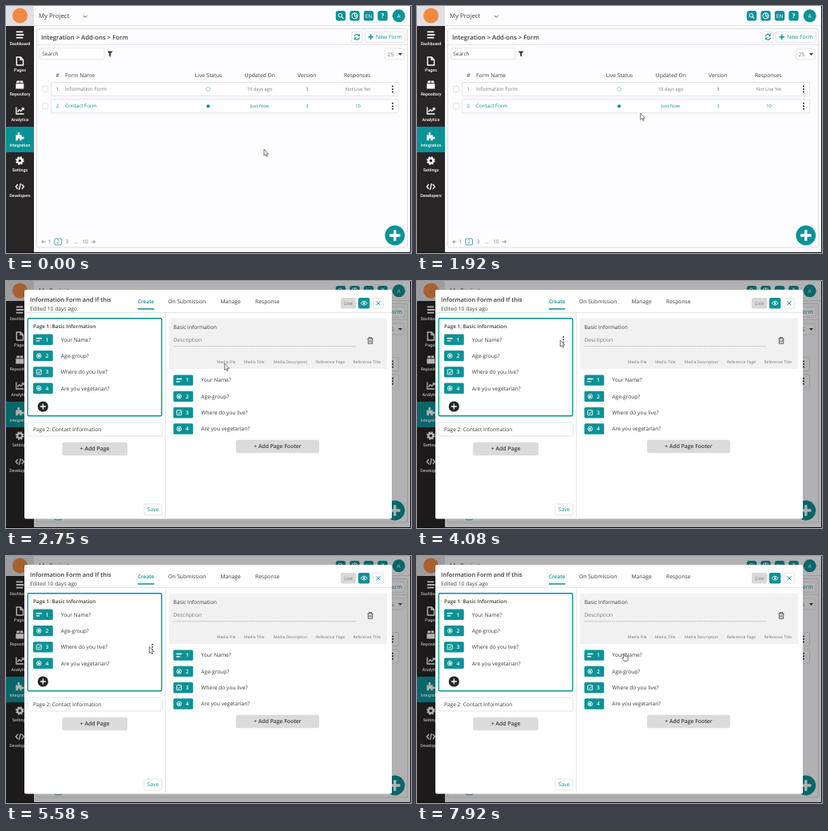
Animation of 507x309 px, one loop 8 s. Source, as an HTML page:

```html
<!DOCTYPE html>
<html lang="en">
<head>
<meta charset="utf-8">
<title>Form builder</title>
<style>
html, body { margin: 0; width: 100%; height: 100%; overflow: hidden; background: #fdfcff; }
svg { display: block; width: 100vw; height: 100vh; }
text { font-family: "Open Sans", "Noto Sans", sans-serif; white-space: pre; text-rendering: geometricPrecision; }
.nav { font-family: Roboto, sans-serif; font-weight: 500; }
</style>
</head>
<body>
<svg id="stage" viewBox="0 0 507 309"></svg>
<script>
const TEAL = '#0b9296', INK = '#3c3c40', GREY = '#77777b', LINE = '#dedee3', PAGE = '#fdfcff';

// Text is placed by the middle of its capitals.
const text = (s, x, y, size, fill = INK, extra = '') =>
  `<text x="${x}" y="${y + size * 0.35}" font-size="${size}" fill="${fill}" ${extra}>${s.replace(/</g, '&lt;')}</text>`;
const MID = 'text-anchor="middle"', BOLD = 'font-weight="600"';
const rect = (x, y, w, h, fill = 'none', stroke = 'none', r = 0, extra = '') =>
  `<rect x="${x}" y="${y}" width="${w}" height="${h}" rx="${r}" fill="${fill}" stroke="${stroke}" ${extra}/>`;
const box = (x, y, w, h, stroke = LINE, r = 1.5) => rect(x, y, w, h, '#fff', stroke, r, 'stroke-width=".8"');
const circle = (x, y, r, fill, stroke = 'none', w = 1) =>
  `<circle cx="${x}" cy="${y}" r="${r}" fill="${fill}" stroke="${stroke}" stroke-width="${w}"/>`;
const line = (d, stroke, w = 1, extra = '') =>
  `<path d="${d}" fill="none" stroke="${stroke}" stroke-width="${w}" ${extra}/>`;
const fill = (d, color) => `<path d="${d}" fill="${color}"/>`;
const at = (x, y, s) => `<g transform="translate(${x} ${y})">${s}</g>`;
const kebab = (x, y, gap, r) => [-gap, 0, gap].map(d => circle(x, y + d, r, '#2c2c2e')).join('');

const navItems = [
  ['Dashboard', 36, 46.8, line('M-4.5-3.7H4M-4.5 0H5M-4.5 3.7H4', '#fff', 1.8)],
  ['Pages', 69, 80.3, line('M-4-5H1L4.2-1.8V5H-4ZM.8-5V-1.6H4', '#fff', 1.4)],
  ['Repository', 98.5, 110.3, fill('M-5-1.2H5V5H-5ZM-4.5-2.2L-3.5-5H-.4V-2.2ZM.4-2.2V-5H3.5L4.5-2.2Z', '#fff')],
  ['Analytics', 131, 141.8, line('M-4.5-4.5V4H5M-3 1.5L-.6-1.2L1.3.6L4.6-3M2.2-3.2H4.7V-.8', '#fff', 1.3)],
  ['Integration', 163, 174.3, fill('M-5-1.5H-2.2Q-4-5-1.5-5T-.8-1.5H2.4V1Q5.4-.3 5.4 2T2.4 3V5.2H0Q.4 2.8-1.2 2.8T-2.4 5.2H-5Z', '#fff')],
  ['Settings', 193.5, 204.8, circle(0, 0, 3, 'none', '#fff', 2.4) +
    `<circle r="4.5" fill="none" stroke="#fff" stroke-width="1.5" stroke-dasharray="2 1.534"/>`],
  ['Developers', 226, 237, line('M-2.5-3L-5 0L-2.5 3M2.5-3L5 0L2.5 3M1-4L-1 4', '#fff', 1.3)],
];

function sidebar() {
  return rect(0, 25, 35, 284, '#282526') + rect(0, 151, 35, 32, TEAL) +
    navItems.map(([name, iconY, y, icon]) =>
      at(17.3, iconY, icon) + text(name, 17.5, y, 5.3, '#fff', MID + ' class="nav"')).join('');
}

function topBar() {
  const icons = [
    circle(-0.6, -0.6, 2.3, 'none', '#fff') + line('M1.1 1.1L3.3 3.3', '#fff', 1.2),
    circle(0, 0, 3.6, 'none', '#fff') + line('M0-3.6V0H3.6M0 0L2.4 2.6', '#fff', .9),
    text('EN', 0, 0, 6.6, '#fff', MID),
    text('?', 0, 0, 8, '#fff', MID + ' font-weight="700"'),
  ];
  return line('M35 24.5H507', '#dedee2', .8) + rect(0, 0, 35, 25, '#e1dfe3') + circle(17.5, 12, 9.5, '#ef8a43') +
    text('My Project', 41, 12.7, 7.8) + line('M97 12L99.3 14.2L101.6 12', INK, .9) +
    icons.map((s, i) => at(419 + i * 17.5, 12.3, rect(-6.2, -6.2, 12.4, 12.4, TEAL, 'none', 3) + s)).join('') +
    circle(491.7, 12.3, 8, TEAL) + text('A', 491.7, 12.3, 6.6, '#fff', MID);
}

function tableRow(y, n, name, updated, answers, live) {
  const c = live ? TEAL : GREY;
  return box(45.5, y - 3.6, 7, 7, LINE, 1) + box(56.5, y - 8.5, 435, 17) +
    text(n, 62.5, y, 6, c) + text(name, 74, y, 6.25, c) +
    (live ? circle(253, y, 2.1, TEAL) : circle(253, y, 2.5, '#fff', '#8cc9cb', .8)) +
    text(updated, 317.5, y, 5.75, c, MID) + text('3', 377, y, 5.75, c, MID) +
    text(answers, 440.5, y, 5.75, c, MID) + kebab(484, y, 3.5, 1);
}

function listPage() {
  const heads = [['#', 64.5], ['Live Status', 253.5], ['Updated On', 317.8], ['Version', 376.8], ['Responses', 439.7]];
  const pages = [['1', 54.6], ['3', 76.5], ['...', 87.3], ['10', 99]];
  return rect(0, 0, 507, 309, PAGE) + topBar() + sidebar() +
    rect(38.5, 28.5, 464, 273.5, PAGE, '#d4d4d9', 2, 'stroke-width=".8"') +
    line('M38.5 48.5H502.5', LINE, .8) +
    text('Integration > Add-ons > Form', 44, 38.8, 7.75, INK, BOLD) +
    box(432.7, 32.2, 13.2, 13) +
    line('M436 38A3.2 3.2 0 0 1 441.8 36.8M442.6 39.6A3.2 3.2 0 0 1 436.8 40.8', TEAL, 1.1) +
    fill('M442.8 34.8V38H439.8ZM435.8 42.8V39.6H438.8Z', TEAL) +
    box(449.5, 32.2, 50, 13) + line('M453.5 38.8H460M456.7 35.6V42', TEAL, 1.4) +
    text('New Form', 463, 39, 6.85, TEAL) +
    box(42.5, 52.7, 80.5, 14) + text('Search', 45.3, 59.6, 6.4) +
    fill('M126.8 56.5H133.6L131.2 59.8V63.6L129.2 62.4V59.8Z', INK) +
    box(474.5, 53, 23.5, 14) + text('25', 477.5, 60.2, 6.8, GREY) + fill('M491 59H496L493.5 62Z', INK) +
    text('Form Name', 74, 87, 6.7) + heads.map(([s, x]) => text(s, x, 87, 6.7, INK, MID)).join('') +
    tableRow(104, '1.', 'Information Form', '10 days ago', 'Not Live Yet', false) +
    tableRow(125.3, '2.', 'Contact Form', 'Just Now', '10', true) +
    pages.map(([s, x]) => text(s, x, 295.2, 6.4, GREY, MID)).join('') +
    line('M49.5 295H44.8M46.8 293L44.8 295L46.8 297M106.8 295H111.5M109.5 293L111.5 295L109.5 297', GREY, .8) +
    box(60.8, 291, 8.8, 7.8, TEAL) + text('2', 65.2, 295.2, 6.4, TEAL, MID) +
    circle(486.8, 287, 12.4, TEAL) + line('M480.1 287H493.5M486.8 280.3V293.7', '#fff', 3.3) +
    line('M0 308.5H506.5V0', '#111');
}

const questions = ['Your Name?', 'Age-group?', 'Where do you live?', 'Are you vegetarian?'];
const rowY = i => 73.3 + i * 20.3;

function question(x, y, i) {
  const choice = circle(0, 0, 2.8, 'none', '#fff', .9) + circle(0, 0, 1.5, '#fff');
  const icon = [
    line('M-3.5-1.6H3.5M-3.5 1.6H1', '#fff', 1.4), choice,
    rect(-3, -3, 6, 6, 'none', '#fff', .5, 'stroke-width=".9"') + line('M-1.6 0L-.3 1.4L2-1.5', '#fff', .9), choice,
  ][i];
  return rect(x, y - 6.7, 24.7, 13.4, TEAL, 'none', 1.5) + at(x + 7.2, y, icon) +
    text(String(i + 1), x + 17.4, y, 6.6, '#fff', MID + ' ' + BOLD) +
    text(questions[i], x + 34.8, y, 6.65);
}

function editor() {
  const media = [['Media File', 264], ['Media Title', 298], ['Media Description', 335],
    ['Reference Page', 388], ['Reference Title', 434.5]];
  const tabs = [['On Submission', 203], ['Manage', 268.5], ['Response', 312]];
  const button = (s, x, y, w, size) =>
    rect(x, y, w, 16.5, '#dcdadb', 'none', 2.5) + text(s, x + w / 2, y + 8.3, size, INK, MID + ' ' + BOLD);
  return rect(0, 0, 507, 309, 'rgba(0,0,0,.3)') + rect(23, 11, 460, 286.5, '#fff', 'none', 2) +
    text('Information Form and If this', 30, 23, 7.45, INK, BOLD) +
    text('Edited 10 days ago', 30, 34.3, 6.75) +
    text('Create', 165, 25.7, 6.5, TEAL, BOLD) + rect(165, 34.2, 20.5, 1.5, TEAL) +
    tabs.map(([s, x]) => text(s, x, 25.7, 6.75)).join('') +
    rect(419, 21, 19.3, 13.5, '#d9d8d9', 'none', 2) + text('Live', 428.7, 27.9, 5.9, GREY, MID) +
    rect(441, 21, 14.3, 13.5, TEAL, 'none', 2) +
    line('M444.2 27.7Q448.2 22.9 452.2 27.7Q448.2 32.5 444.2 27.7Z', '#fff', .9) + circle(448.2, 27.7, 1.3, '#fff') +
    box(459.7, 21.3, 12.6, 13) + line('M463.4 25.2L468.6 30.4M468.6 25.2L463.4 30.4', TEAL) +
    line('M23 39.5H483', '#dfdfe3', .8) + line('M199.5 39.5V297', '#cfcfd3', .8, 'stroke-dasharray="1.5 1"') +
    rect(27.2, 46.7, 167.6, 122, '#fff', TEAL, 1.5, 'stroke-width="1.4"') +
    text('Page 1: Basic Information', 34, 57, 6.4, INK, BOLD) +
    questions.map((_, i) => question(34, rowY(i), i) + question(209.5, rowY(i) + 50.8, i)).join('') +
    circle(46.3, 157, 6.6, '#252526') + line('M42.8 157H49.8M46.3 153.5V160.5', '#fff', 1.3) +
    box(27, 177, 168.3, 17) + text('Page 2: Contact Information', 34, 185.5, 6.55) +
    button('+ Add Page', 70.3, 201.7, 81.7, 6.9) + button('+ Add Page Footer', 288, 198.8, 104, 6.8) +
    box(173, 279, 22, 13.8) + text('Save', 184, 286, 6.7, TEAL, MID) +
    rect(204, 47, 273, 63, '#f2f1f2', 'none', 1.5) +
    text('Basic Information', 209.5, 57.2, 6.6) + text('Description', 209.5, 73.2, 6.65, GREY) +
    line('M209.5 81.7H438', '#a9a9ad', .8, 'stroke-dasharray="1.5 .8"') +
    line('M452.5 72H459.5M454.5 72V70.5H457.5V72M453.3 72V78.3H458.7V72M455 73.8V76.8M457 73.8V76.8', INK, .8) +
    media.map(([s, x]) => text(s, x, 101.5, 5, GREY)).join('');
}

const arrow = '<path d="M0 0V8.3L1.9 6.6L3.2 9.3L4.5 8.7L3.2 6.1H5.7Z" fill="#fff" stroke="#4a4a4e" stroke-width=".75"/>';
const hand = '<path d="M1.7 6V.9Q2.4-.4 3.2.9V3.7Q4.2 2.8 4.7 4Q5.8 3.2 6.2 4.4Q7.4 3.8 7.5 5.2V7.2Q7.3 8.5 6.6 9.7H2.7Q1.6 7.7-.1 6.3Q.3 4.8 1.7 6Z" fill="#fff" stroke="#4a4a4e" stroke-width=".8"/>';

const stage = document.getElementById('stage');
stage.innerHTML = listPage() +
  `<g id="editor">${editor()}</g><g id="dots">${kebab(183.3, 0, 3.3, .9)}</g>` +
  `<g id="cursor"><g id="arrow">${arrow}</g><g id="hand">${hand}</g></g>`;

const el = id => document.getElementById(id);
const show = (id, on) => el(id).setAttribute('display', on ? 'inline' : 'none');
const move = (id, x, y) => el(id).setAttribute('transform', `translate(${x} ${y})`);

// Pointer stops: time, x, y
const stops = [
  [500, 323, 179], [1080, 286, 166], [1330, 286, 166], [2500, 273.7, 103.2], [2920, 273.7, 103.2],
  [3850, 179.3, 74], [4250, 179.3, 74], [4750, 179.3, 94], [5050, 179.3, 94], [5500, 179.3, 113.5],
  [5750, 179.3, 113.5], [6150, 179.3, 134], [6350, 179.3, 134], [7200, 256.7, 121.7],
];

function pointer(t) {
  const k = stops.findIndex(s => s[0] > t);
  if (k === 0) return stops[0].slice(1);
  if (k < 0) return stops[stops.length - 1].slice(1);
  const [t0, x0, y0] = stops[k - 1], [t1, x1, y1] = stops[k];
  const p = (t - t0) / (t1 - t0), e = p * p * (3 - 2 * p);
  return [x0 + (x1 - x0) * e, y0 + (y1 - y0) * e];
}

function draw(now) {
  const t = now % 8000, open = t >= 2750;
  const [x, y] = pointer(t);
  const row = Math.round((y - rowY(0)) / 20.3);
  const onRow = open && x > 28 && x < 194 && row >= 0 && row < 4;
  const onLink = open
    ? x > 244 && x < 306 && y > 117 && y < 191
    : (y > 96 && y < 112.5) || (y > 117 && y < 133.5);
  show('editor', open);
  show('dots', onRow);
  move('dots', 0, rowY(row));
  move('cursor', x, y);
  show('hand', onLink);
  show('arrow', !onLink);
  requestAnimationFrame(draw);
}
draw(performance.now());
</script>
</body>
</html>
```
